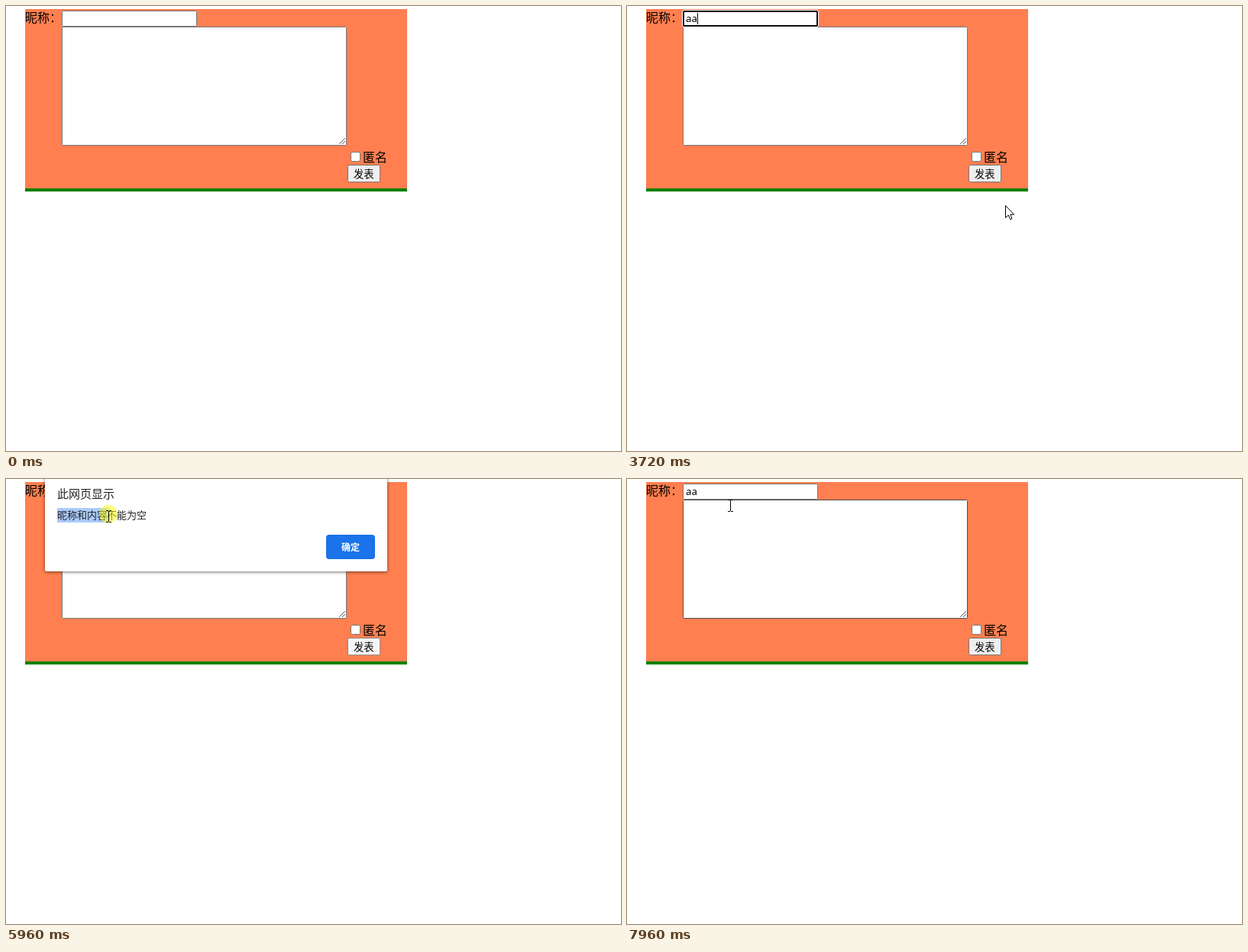
These frames come from a looping animation (805 by 583 pixels, 8000 ms). An HTML page:

```html
<!DOCTYPE html>
<html lang="zh">
<head>
<meta charset="utf-8">
<title>留言板</title>
<style>
  html, body { margin: 0; width: 100%; height: 100%; overflow: hidden; background: #fff; }
  svg { display: block; width: 805px; height: 583px; }
  text { font-family: "Noto Sans CJK SC", "Noto Sans CJK", sans-serif; fill: #000; white-space: pre; }
  .latin { font-family: "Noto Sans", "Open Sans", sans-serif; }
  .field { fill: #fff; stroke: #767676; }
  .field.hover { stroke: #4f4f4f; }
  .button { fill: #efefef; stroke: #767676; }
  .button.hover { fill: #e5e5e5; stroke: #4f4f4f; }
  .button.active { fill: #f5f5f5; stroke: #8d8d8d; }
  .sheet { fill: #fff; filter: drop-shadow(0 1px 2px rgba(0, 0, 0, .55)); }
  .ok { fill: #1a73e8; }
  .ok.focus { fill: #4289ee; stroke: #b0d0fb; stroke-width: 2; paint-order: stroke; }
  .beam { stroke: #000; fill: none; }
  .beam.tint .stem { stroke: #8fb9f2; }
  .beam.tint .foot { stroke: #f08a35; }
</style>
</head>
<body>
<svg viewBox="0 0 805 583">
  <rect x="25" y="4" width="500" height="235" fill="#ff7f50"/>
  <rect x="25" y="239" width="500" height="4" fill="#008000"/>
  <text x="25" y="21" font-size="16">昵称：</text>

  <rect id="area" class="field" x="73.5" y="27.5" width="372" height="155" rx="1"/>
  <path d="M436.5 180.5L443.5 173.5M440.5 180.5L443.5 177.5" stroke="#555" stroke-linecap="square"/>
  <rect id="input" class="field" x="73.5" y="6.5" width="176" height="20" rx="1"/>
  <g id="ring" fill="none">
    <rect x="72.5" y="5.5" width="178" height="22" rx="2.5" stroke="#fff"/>
    <rect x="74" y="7" width="175" height="19" rx="1.5" stroke="#101010" stroke-width="2"/>
  </g>
  <text id="name" class="latin" x="77" y="21" font-size="13.33"></text>
  <rect id="caret" y="9" width="1" height="15"/>

  <rect x="451.5" y="191.5" width="12" height="12" rx="2" fill="#fff" stroke="#767676"/>
  <text x="467" y="204" font-size="16">匿名</text>
  <rect id="post" class="button" x="447.5" y="208.5" width="42" height="22" rx="2"/>
  <text x="455" y="225" font-size="13.33">发表</text>

  <g id="dialog">
    <rect class="sheet" x="51" y="-60" width="448" height="181" rx="2"/>
    <text x="67" y="25" font-size="15" style="fill:#202124">此网页显示</text>
    <rect id="marked" x="67" y="38" height="19" fill="#accbfb"/>
    <text x="67" y="52" font-size="13" style="fill:#202124">昵称和内容不能为空</text>
    <rect id="ok" class="ok" x="419" y="73" width="64" height="32" rx="4"/>
    <text x="439" y="94" font-size="12" font-weight="700" style="fill:#fff">确定</text>
  </g>

  <g id="pointer">
    <circle id="press" r="12" fill="#ff0" fill-opacity=".5"/>
    <path id="arrow" d="M.5.5V16.5L4.2 13L6.7 18.7L9 17.7L6.6 12.2H11.6Z" fill="#fff" stroke="#000"/>
    <g id="beam" class="beam">
      <path class="stem" d="M-3-4.5H0M1-4.5H4M.5-4V10"/>
      <path class="foot" d="M-3 10.5H0M1 10.5H4"/>
    </g>
  </g>
</svg>
<script>
const LOOP = 8000, STEP = 77.1, BLINK = 520;
// the story: the pointer enters, focuses the field, types, posts, selects, dismisses
const ENTER = 210, FOCUS = 1530, TYPE = 3100, KEY_GAP = 300;
const POST = 4180, OPEN = 4405, DRAG = 5730, DROP = 6880, CONFIRM = 7420, CLOSE = 7640;
const CLICK = 150, FADE = 230;

const byId = id => document.getElementById(id);
const [area, input, ring, nick, caret, post, dialog, marked, ok, pointer, press, arrow, beam] =
  ['area', 'input', 'ring', 'name', 'caret', 'post', 'dialog', 'marked', 'ok',
   'pointer', 'press', 'arrow', 'beam'].map(byId);

// pointer moves, each easing out from wherever the last one ended
const moves = [
  { from: ENTER, to: 1350, x: 155, y: 19 },
  { from: 1830, to: 2220, x: 189, y: 38 },
  { from: 3500, to: 3710, x: 495, y: 261 },
  { from: 3720, to: 4020, x: 463, y: 216 },
  { from: 4715, to: 5020, x: 150, y: 72 },
  { from: 5035, to: 5550, x: 67, y: 46 },
  { from: DRAG, to: 6420, x: 190, y: 46 },
  { from: 6420, to: 6795, x: 222, y: 86 },
  { from: 6890, to: 7725, x: 425, y: 86 },
  { from: 7735, to: 7950, x: 135, y: 32 }
];

const within = (t, a, length) => t >= a && t < a + length;
const show = (el, on) => el.style.display = on ? '' : 'none';
const ramp = (t, a, b) => Math.min(1, Math.max(0, (t - a) / (b - a)));
const easeOut = u => 1 - (1 - u) ** 2;

function place(t) {
  let x = 768, y = 562;
  for (const m of moves) {
    const k = easeOut(ramp(t, m.from, m.to));
    x += (m.x - x) * k;
    y += (m.y - y) * k;
  }
  return [Math.round(x), Math.round(y)];
}

function tick(t) {
  const base = t < 2300 ? ENTER : POST;
  return base + Math.floor((t - base) / STEP) * STEP;
}

function draw(time) {
  const t = Math.max(0, tick(time));
  const [x, y] = place(t);
  const seen = time >= ENTER;
  const modal = within(t, OPEN, CLOSE - OPEN);
  const over = (l, top, r, b) => seen && x >= l && x < r && y >= top && y < b;
  const inArea = !modal && over(73, 27, 446, 183);
  const inInput = !modal && over(73, 6, 250, 27);
  const inText = modal && over(60, 36, 194, 58);

  area.classList.toggle('hover', inArea);
  input.classList.toggle('hover', inInput);
  post.classList.toggle('active', within(time, POST, CLOSE - POST));
  post.classList.toggle('hover', !modal && over(447, 208, 490, 231));

  // the caret restarts its blink with every key
  const typed = Math.min(2, Math.max(0, Math.floor((time - TYPE) / KEY_GAP) + 1));
  const lastKey = typed ? TYPE + (typed - 1) * KEY_GAP : FOCUS;
  nick.textContent = 'a'.repeat(typed);
  show(ring, within(time, FOCUS, OPEN - FOCUS));
  show(caret, within(time, FOCUS, POST - FOCUS) && (time - lastKey) % (2 * BLINK) < BLINK);
  caret.setAttribute('x', Math.round(77 + typed * 7.4));

  const enter = ramp(t, OPEN - STEP, OPEN + FADE), leave = ramp(t, CLOSE, CLOSE + FADE);
  show(dialog, within(t, OPEN, CLOSE + FADE - OPEN));
  dialog.setAttribute('transform', `translate(0 ${Math.round(-13 * (1 - enter + leave))})`);
  dialog.style.opacity = enter * (1 - leave ** 4);
  ok.classList.toggle('focus', time < DRAG);
  marked.setAttribute('width', time < DRAG ? 0 : Math.min(117, Math.max(0, x - 67)));

  show(pointer, seen);
  pointer.setAttribute('transform', `translate(${x} ${y})`);
  show(press, within(time, DRAG, DROP - DRAG) ||
              [FOCUS, POST, CONFIRM].some(c => within(time, c, CLICK)));
  const text = inArea || inInput || inText;
  show(beam, text);
  show(arrow, !text);
  beam.classList.toggle('tint', within(t, CLOSE, CLICK) && over(419, 60, 483, 100));

  // the selection stays complete while the dialog leaves
  if (t >= CLOSE) marked.setAttribute('width', 117);
}

const start = performance.now();
function frame() {
  draw((performance.now() - start) % LOOP);
  requestAnimationFrame(frame);
}
frame();
</script>
</body>
</html>
```
